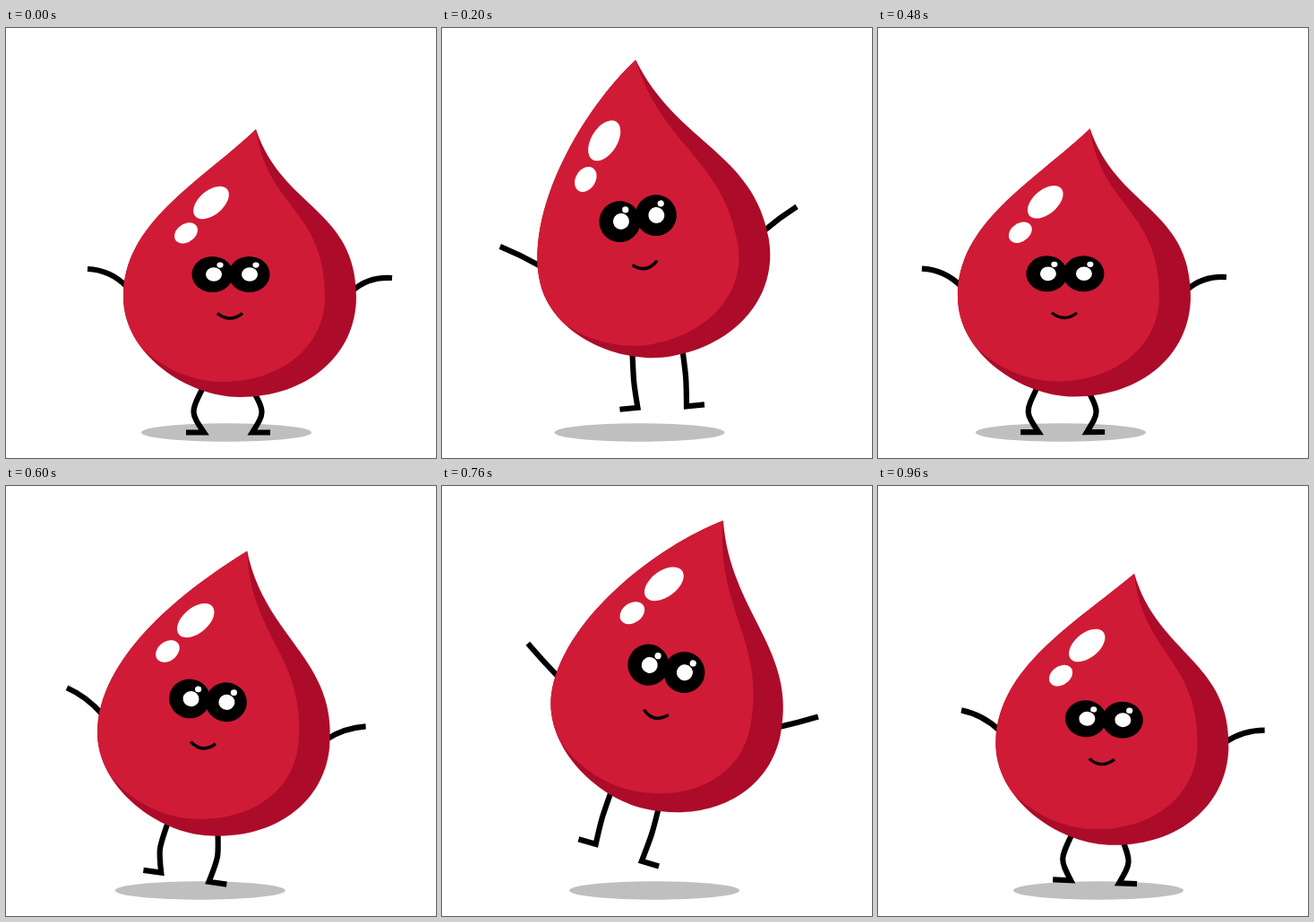
An HTML page with a canvas for the animation above (1000 ms loop, 480 by 480 pixels).

```html
<!DOCTYPE html>
<html lang="en">
<head>
<meta charset="utf-8">
<title>Hopping drop</title>
<style>
html, body { margin: 0; height: 100%; overflow: hidden; background: #fff; }
canvas { display: block; width: 100vw; height: 100vh; }
</style>
</head>
<body>
<canvas id="stage" width="480" height="480"></canvas>
<script>
const ctx = document.getElementById('stage').getContext('2d');
const HOP = 500, STEP = 40;

const mix = (a, b, k) => a + (b - a) * k;
const clamp = v => Math.min(1, Math.max(0, v));
const smooth = v => (v = clamp(v)) * v * (3 - 2 * v);

// Drop outline, relative to the point between the eyes; k runs from squashed (0) to stretched (1)
function drop(left, right, inset, lean, k) {
  const tipX = 28, tipY = mix(-162, -175, k);
  const waist = mix(25, 47, k), floor = mix(137, 158, k) - inset;
  const mid = (left + right) / 2;
  const round = .58, low = mix(waist, floor, round);
  const path = new Path2D();
  path.moveTo(tipX, tipY);
  path.bezierCurveTo(tipX - 66, tipY + mix(62, 43, k), left, waist - 82, left, waist);
  path.bezierCurveTo(left, low, mix(mid, left, 1 - round + .02), floor, mid, floor);
  path.bezierCurveTo(mix(mid, right, round), floor, right, low, right, waist);
  path.bezierCurveTo(right, waist - 98, tipX + lean, tipY + mix(88, 100, k), tipX, tipY);
  return path;
}

function ellipse(x, y, rx, ry, color, turn = 0) {
  ctx.fillStyle = color;
  ctx.beginPath();
  ctx.ellipse(x, y, rx, ry, turn, 0, Math.PI * 2);
  ctx.fill();
}

function arm(side, k, bend) {
  const x = 10 + side * 126, y = mix(16, 36, k) + side * 2;
  const hx = 10 + side * mix(170, 167, k), hy = mix(-1, 11, k) + side * mix(5, 6.5, k);
  ctx.beginPath();
  ctx.moveTo(x, y);
  ctx.quadraticCurveTo((x + hx) / 2 + side * bend * .4, (y + hy) / 2 + bend, hx, hy);
  ctx.stroke();
}

function leg(side, k) {
  const x = side * 28 - 4, y = mix(128, 148, k);
  const ax = side * 27 + mix(-3, -9.5, k), ay = mix(176.5, 212, k) + side * 4 * k;
  const kx = (x + ax) / 2 + side * mix(14, 2, k), ky = (y + ay) / 2 + 2;
  ctx.beginPath();
  ctx.moveTo(x, y);
  ctx.bezierCurveTo(kx, ky, kx, ky, ax, ay);
  ctx.lineTo(ax + side * 20, ay + side * 1.5 * k);
  ctx.stroke();
}

function face(k) {
  ctx.save();
  ctx.scale(1, mix(.87, 1, k));
  ellipse(-22, -92, 25, 14.5, '#fff', -.84);
  ellipse(-50, -53, 15, 11, '#fff', -.84);
  for (const side of [-1, 1]) ellipse(side * 20.5, 0, 23, 23, '#000');
  for (const side of [-1, 1]) {
    ellipse(side * 20 + 1, 0, 9, 9, '#fff');
    ellipse(side * 20 + 8, -12, 3.6, 3.6, '#fff');
  }
  ctx.lineWidth = 3.6;
  ctx.beginPath();
  ctx.moveTo(-15, 50);
  ctx.quadraticCurveTo(-1, 63, 13, 50);
  ctx.stroke();
  ctx.restore();
}

function draw(time) {
  const loop = Math.floor(time / STEP) * STEP % (2 * HOP);
  const t = loop % HOP, dir = loop < HOP ? -1 : 1;

  // Quick stretch, steady rise, then a sudden drop back into the squash
  const air = 1 - smooth((t - 380) / 105);
  const k = smooth(t / 170) * air;
  const lift = .15 * t * air;
  const tilt = .244 * Math.sin(Math.min(t, 400) / 400 * Math.PI / 2) * air;
  const x = 225 + dir * mix(-21, 21, clamp(t / 330));
  const bend = lift / 4 - 9;

  ctx.fillStyle = '#fff';
  ctx.fillRect(0, 0, 480, 480);
  ellipse(x, 451.5, 95, 10.3, '#bfbfbf');

  ctx.save();
  ctx.translate(x + 5, 315 - 33 * k - lift);
  ctx.rotate(dir * tilt);
  ctx.translate(0, -40);

  ctx.strokeStyle = '#000';
  ctx.lineWidth = 6.2;
  for (const side of [-1, 1]) {
    arm(side, k, bend);
    leg(side, k);
  }

  const skin = drop(-120, 140, 0, 29, k);
  ctx.fillStyle = '#ac0c29';
  ctx.fill(skin);
  ctx.save();
  ctx.clip(skin);
  ctx.fillStyle = '#d01b36';
  ctx.fill(drop(-125, 105, 17, 12, k));
  ctx.restore();
  face(k);
  ctx.restore();
}

const start = performance.now();
function tick() {
  draw(performance.now() - start);
  requestAnimationFrame(tick);
}
tick();
</script>
</body>
</html>
```
